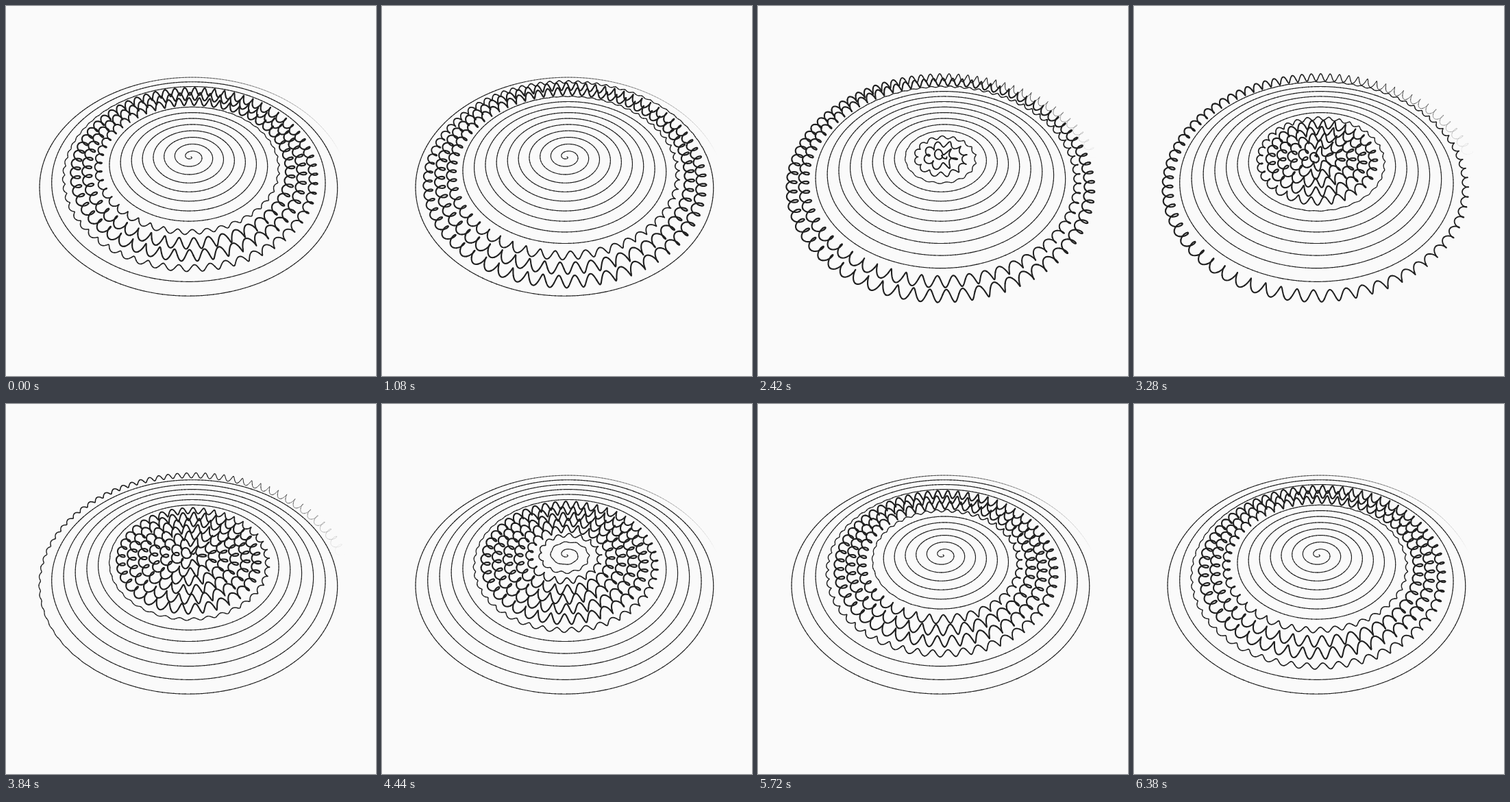
An HTML page with a canvas that plays this animation: 540x540 px, repeating every 6.4 s.

```html
<!DOCTYPE html>
<html lang="en">
<head>
<meta charset="utf-8">
<title>Coiling spiral</title>
<style>
html, body { margin: 0; height: 100%; overflow: hidden; background: #fafafa; }
canvas { display: block; }
</style>
</head>
<body>
<canvas id="stage" width="540" height="540"></canvas>
<script>
const ctx = document.getElementById('stage').getContext('2d');
const TAU = 2 * Math.PI;
const LOOP = 6400;
const RADIUS = 220, TURNS = 14;
const COILS = 550, SPIN = 4, COIL_RADIUS = 6.4;
const STEPS = 9900, CHUNK = 6;
const TILT = 0.7, CAMERA = 467.65;
const cosT = Math.cos(TILT), sinT = Math.sin(TILT);

const clamp = x => Math.max(0, Math.min(1, x));
const smooth = x => { x = clamp(x); return x * x * (3 - 2 * x); };

// Strength of the coiled stretch at p (0 centre, 1 rim), one per unit length.
function strength(p, t) {
  const d = p - 0.5 - t;
  return smooth((0.2 - Math.abs(d - Math.round(d))) / 0.1);
}

function project(x, y, z) {
  const k = CAMERA / (CAMERA - y * sinT - z * cosT);
  return [270 + x * k, 270 + (y * cosT - z * sinT - 50) * k];
}

// A helix wound around an Archimedean spiral, evenly spaced by arc length.
function point(p, t) {
  const root = Math.sqrt(p);
  const angle = TAU * TURNS * root;
  const phase = TAU * (COILS * p - SPIN * t + 0.5);
  const a = COIL_RADIUS * strength(p, t);
  const r = RADIUS * root + a * Math.cos(phase);
  return project(r * Math.cos(angle), r * Math.sin(angle), a * Math.sin(phase));
}

function draw(t) {
  ctx.fillStyle = '#fafafa';
  ctx.fillRect(0, 0, 540, 540);
  ctx.strokeStyle = '#202020';
  ctx.lineCap = ctx.lineJoin = 'round';
  let last = point(0, t);
  for (let i = 0; i < STEPS; i += CHUNK) {
    const mid = (i + CHUNK / 2) / STEPS;
    ctx.lineWidth = (1.15 + 0.95 * strength(mid, t)) * clamp((1 - mid) / 0.05);
    ctx.beginPath();
    ctx.moveTo(...last);
    for (let j = 1; j <= CHUNK; j++) {
      last = point((i + j) / STEPS, t);
      ctx.lineTo(...last);
    }
    ctx.stroke();
  }
}

const start = performance.now();
function frame() {
  draw((performance.now() - start) % LOOP / LOOP);
  requestAnimationFrame(frame);
}
frame();
</script>
</body>
</html>
```
